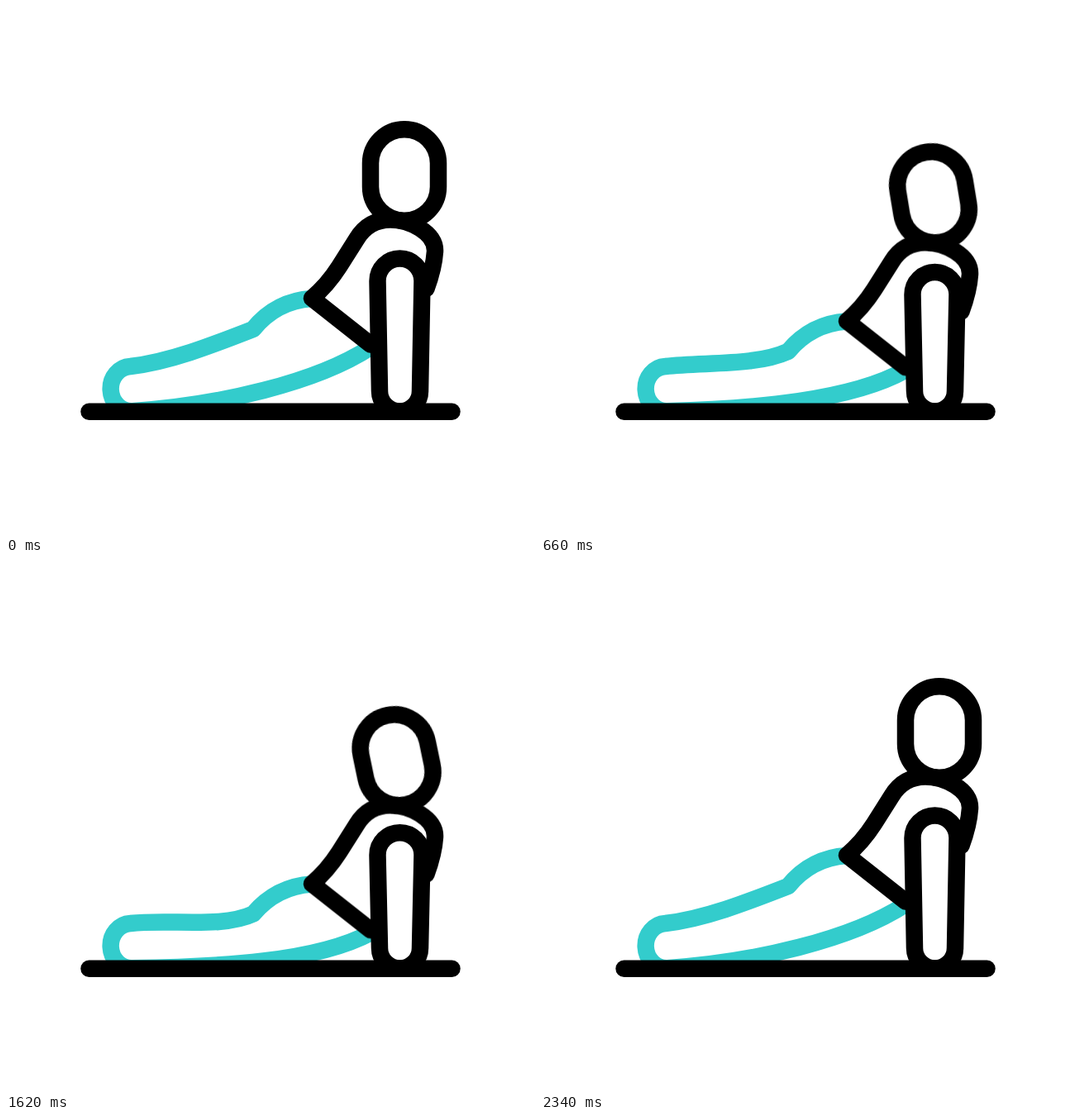
An HTML page that plays this animation: 640x640 px, repeating every 2400 ms.

```html
<!DOCTYPE html>
<html lang="en">
<head>
<meta charset="utf-8">
<title>Cobra stretch</title>
<style>
  html, body { margin: 0; width: 100%; height: 100%; overflow: hidden; background: #fff; }
  svg { display: block; width: 100%; height: 100%; }
  path, rect { fill: none; stroke: #000; stroke-width: 20.5; stroke-linecap: round; stroke-linejoin: round; }
  #legs { stroke: #33cccc; }
  #head { transform-origin: 474px 250px; }
</style>
</head>
<body>
<svg viewBox="0 0 640 640">
  <path id="legs"/>
  <path id="torso" d="M441 409.5L370 353.5C385 341 394 329.5 403 315.5L424.5 281.5C434 266 448 258.5 465 258.5C488 258.5 520 274 519 297C518 312 514 327 508.5 342"/>
  <path id="arm"/>
  <rect id="head" x="441" y="149.3" width="82" height="110.4" rx="41"/>
  <path d="M100.5 490.75H539.5"/>
</svg>
<script>
  const LOOP = 2400, LOW = 1200, END = 2340;
  const DROP = 44.2;
  const EASE = 'cubic-bezier(.6, 0, .4, 1)';

  // p: 0 = raised, 1 = lowered
  const legs = p => {
    const y = DROP * p;
    return `M441 ${413 + y}` +
      `C375 ${456 + 34.5 * p} 258 ${483 + 7.2 * p} 153 490.2` +
      `A25 27 0 0 1 150.5 436` +
      `C198 430.5 ${249 + 16.5 * p} ${410.5 + 40.5 * p} 299 ${391 + 43 * p}` +
      `C316 ${370 + y} 339 ${356 + y} 370 ${354 + y}`;
  };

  const arm = p => {
    const y = 332.5 + 26.5 * p;
    return `M452 466L449.5 ${y}A27 27 0 0 1 503.5 ${y}L501 466A24.5 24.5 0 0 1 452 466Z`;
  };

  const shape = draw => p => ({ d: `path("${draw(p)}")` });
  const poses = {
    legs: shape(legs),
    arm: shape(arm),
    torso: p => ({ transform: `translate(0px, ${DROP * p}px)` }),
    head: p => ({ transform: `translate(0px, ${DROP * p}px) rotate(${-15 * p}deg)` })
  };

  const steps = [[0, 0], [LOW, 1], [END, 0], [LOOP, 0]];
  for (const [id, pose] of Object.entries(poses)) {
    const frames = steps.map(([t, p]) => ({ offset: t / LOOP, easing: EASE, ...pose(p) }));
    document.getElementById(id).animate(frames, { duration: LOOP, iterations: Infinity });
  }
</script>
</body>
</html>
```
